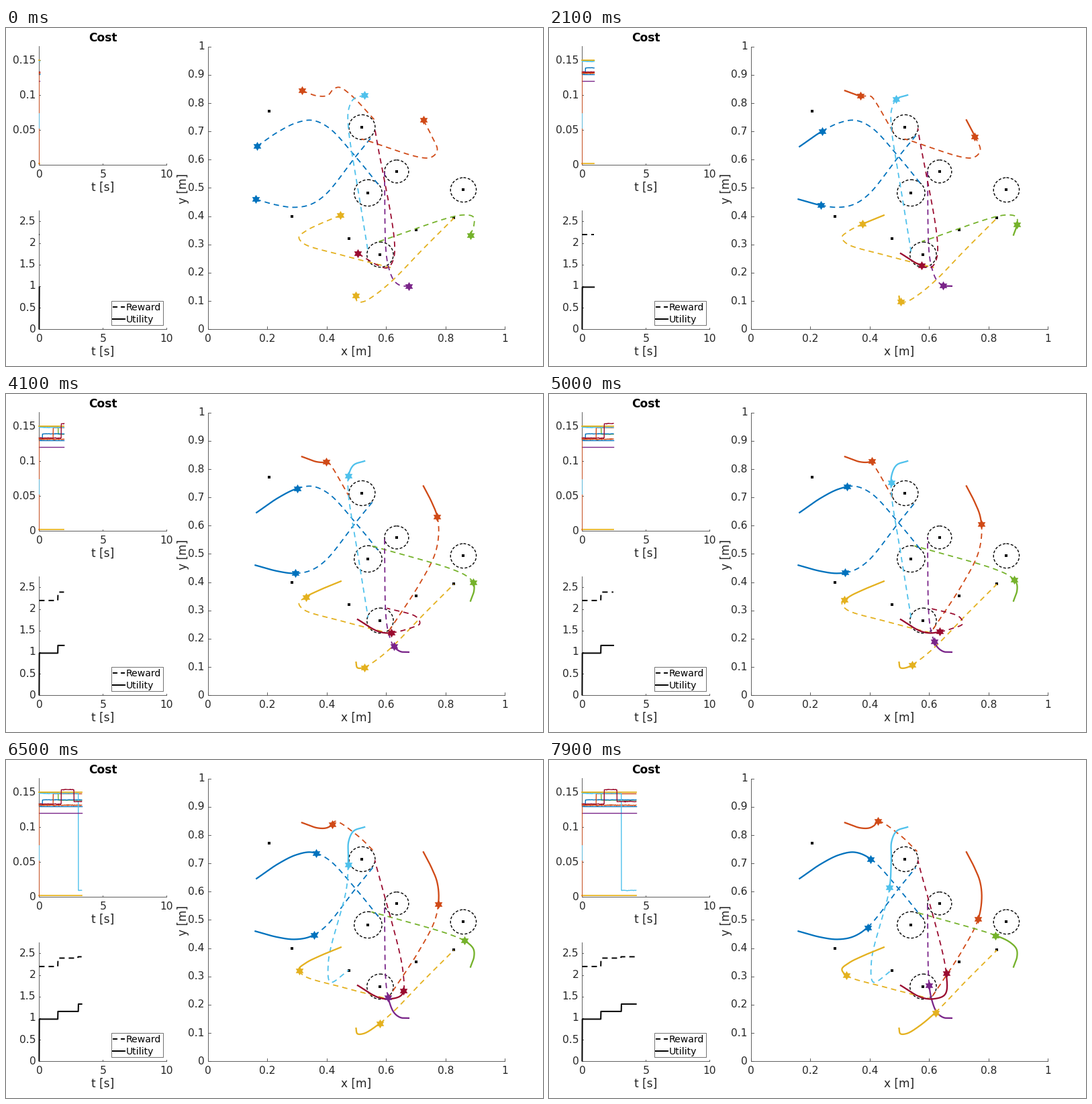
Animation of 800x504 px, one loop 8 s. Source, as a matplotlib script:

```python
import numpy as np
import matplotlib.pyplot as plt
from matplotlib.animation import FuncAnimation
from matplotlib.patches import Ellipse, Rectangle
from matplotlib.path import Path

W, H, FRAMES, STEP = 800, 504, 80, 100
LEG = 20      # frames between driven waypoints
DRIVEN = 5    # waypoints reached within one loop
SHIFT = 0.6   # pixel alignment of the whole stage

BLUE, ORANGE, YELLOW, PURPLE = "#0072bd", "#d04a17", "#e4b11f", "#7a2589"
GREEN, CYAN, CRIMSON, INK, AXIS = "#75b22b", "#4fc1ec", "#9a0c30", "#262626", "#505050"

plt.rcParams.update({"font.family": "DejaVu Sans", "lines.scale_dashes": False,
                     "lines.dash_capstyle": "butt"})


def spline(x, y, q):
    """Cubic Hermite spline through (x, y), evaluated at q."""
    x, y, q = np.asarray(x, float), np.asarray(y, float), np.atleast_1d(q)
    h = np.diff(x)
    col = (-1,) + (1,) * (y.ndim - 1)
    d = np.diff(y, axis=0) / h.reshape(col)
    a, b = h[:-1].reshape(col), h[1:].reshape(col)
    m = np.concatenate([d[:1], (b * d[:-1] + a * d[1:]) / (a + b), d[-1:]])
    i = np.clip(np.searchsorted(x, q, side="right") - 1, 0, len(h) - 1)
    u, hi = ((q - x[i]) / h[i]).reshape(col), h[i].reshape(col)
    return (y[i] * (1 + 2 * u) * (1 - u) ** 2 + m[i] * hi * u * (1 - u) ** 2
            + y[i + 1] * u * u * (3 - 2 * u) + m[i + 1] * hi * u * u * (u - 1))


class Curve:
    """Smooth path through waypoints, spaced by centripetal chord length."""

    def __init__(self, pts):
        self.pts = np.array(pts, float)
        seg = np.sqrt(np.hypot(*np.diff(self.pts, axis=0).T))
        self.s = np.concatenate([[0], np.cumsum(seg)])

    def part(self, a, b):
        return spline(self.s, self.pts, np.linspace(a, b, 200))

    def after(self, pos):
        pts = self.part(0, self.s[-1])
        k = np.argmin(np.hypot(*(pts - pos).T))
        return np.vstack([pos, pts[k + 1:]])


class Agent:
    """Reaches one waypoint per leg; the points beyond are its plan.

    Dropped plans are (until, shared waypoints, rest of the plan).
    """

    def __init__(self, color, way, *dropped):
        self.path = Curve(way)
        self.dropped = [(until, Curve(way[:k] + rest)) for until, k, rest in dropped]
        self.trail, = ax.plot([], [], color=color, lw=2.3, zorder=4,
                              solid_capstyle="butt")
        self.plan, = ax.plot([], [], color=color, lw=1.8, zorder=3, dashes=(8, 6))
        self.star, = ax.plot([], [], color=color, marker=HEXAGRAM, ms=13.4,
                             mew=0, ls="", zorder=5)

    def update(self, n):
        s = self.path.s
        begin, now = spline(LEG * np.arange(DRIVEN), s[:DRIVEN], [-1, n])
        trail = self.path.part(begin, now)
        plan = next((c.after(trail[-1]) for until, c in self.dropped if n < until),
                    self.path.part(now, s[-1]))
        self.trail.set_data(*trail.T)
        self.plan.set_data(*plan.T)
        self.star.set_data(*trail[-1:].T)


class Trace:
    """A stepped time series: (x from, level), ... with optional noise."""

    def __init__(self, color, *steps, noise=0, **style):
        self.x = np.arange(50, 140, 0.25)
        starts, levels = np.array(steps, float).T
        self.y = levels[np.searchsorted(starts, self.x, side="right") - 1]
        self.y += noise * np.repeat(rng.normal(size=len(self.x) // 4), 4)
        self.line, = ax.plot([], [], color=color, **{"lw": 1.4, **style})

    def update(self, cursor):
        k = self.x <= cursor
        self.line.set_data(self.x[k], self.y[k])


def text(x, y, s, size, **kw):
    ax.text(x, y, s, fontsize=size, **{"ha": "center", "va": "center",
                                       "color": INK, **kw})


def axes(x0, x1, y0, y1, xlim, xstep, ylim, ystep, ytop, xlabel, tick):
    """Left and bottom axis lines with inward ticks; ytop is the last y label."""
    style = dict(color=AXIS, lw=0.9, zorder=2)
    ax.plot([x0, x0, x1], [y1, y0, y0], **style)
    for v in np.arange(0, xlim + xstep / 2, xstep):
        x = x0 + (x1 - x0) * v / xlim
        ax.plot([x, x], [y0, y0 - tick], **style)
        text(x, y0 + 14, f"{v:g}", 15.5)
    for v in np.arange(0, ytop + ystep / 2, ystep):
        y = y0 + (y1 - y0) * v / ylim
        ax.plot([x0, x0 + tick], [y, y], **style)
        text(x0 - 5, y, f"{v:.2g}", 15.5, ha="right")
    text((x0 + x1) / 2, y0 + 34, xlabel, 17)


rng = np.random.default_rng(4)
HEXAGRAM = Path.unit_regular_star(6, innerCircle=0.577)

fig = plt.figure(figsize=(W / 72, H / 72), dpi=72, facecolor="white")
ax = fig.add_axes([0, 0, 1, 1])
ax.set(xlim=(SHIFT, W + SHIFT), ylim=(H + SHIFT, SHIFT))
ax.axis("off")

# Axes, labels and legend
axes(50, 240, 204.8, 28, 10, 5, 0.17, 0.05, 0.15, "t [s]", 2)
axes(50, 240, 449.8, 273, 10, 5, 2.75, 0.5, 2.5, "t [s]", 2)
axes(301.4, 744, 449.8, 28.4, 1, 0.2, 1, 0.1, 1, "x [m]", 4.4)
text(145, 15.5, "Cost", 17, weight="bold", color="black")
text(264.5, 240, "y [m]", 17, rotation=90)

ax.add_patch(Rectangle((157.2, 407.2), 77, 36, fc="white", ec=AXIS, lw=0.8, zorder=8))
for y, name, dash in ((416.7, "Reward", (0, (7, 5))), (434.2, "Utility", "-")):
    ax.plot([160, 177.5], [y, y], color="black", lw=2, ls=dash, zorder=9)
    text(179.3, y + 5.3, name, 14, ha="left", va="baseline", color="black", zorder=9)

# Targets (x, y, radius of the region around it)
for x, y, r in ((393, 125, 0), (531, 148.5, 19), (582.5, 214.5, 17.5),
                (540, 246.5, 20.2), (682, 242, 18.7), (668, 284, 0),
                (611.5, 301.5, 0), (427, 282, 0), (511.5, 314.5, 0),
                (558, 338.5, 19.2)):
    ax.plot(x, y, "s", color="black", ms=4.2, mew=0, zorder=3)
    if r:
        ax.add_patch(Ellipse((x, y), 2.05 * r, 1.95 * r, fill=False, ec="black",
                             lw=1.4, ls=(0, (4, 2.6)), zorder=3))

# Cost traces
for color, top, bottom in ((ORANGE, 66, 204), (CYAN, 128, 150)):
    ax.plot([50, 50], [top, bottom], color=color, lw=0.9, zorder=2.5)
traces = [
    Trace(GREEN, (50, 49), (78.3, 60.5)),
    Trace(BLUE, (50, 69.7)),
    Trace(BLUE, (50, 68.5), (55, 60), noise=0.15),
    Trace(ORANGE, (50, 68), noise=0.35),
    Trace(ORANGE, (50, 66.5), (71, 51)),
    Trace(CYAN, (50, 50.5), (108.5, 195), noise=0.2),
    Trace(YELLOW, (50, 49), lw=1.8),
    Trace(CRIMSON, (50, 66.3), (83, 44.8), (102, 62.5), noise=0.25),
    Trace(PURPLE, (50, 79.5)),
    Trace(YELLOW, (50, 202.5), lw=1.8),
    Trace("black", (50, 449), (50.2, 387), (78, 375.5), (108.5, 364.5), lw=2),
    Trace("black", (50, 308.5), (78, 300), (79.3, 296), (108, 294), lw=2,
          dashes=(8, 6)),
]

agents = [
    Agent(BLUE, [(374.5, 177), (405.7, 155.6), (433, 142), (456.5, 138.2),
                 (481, 149), (521, 192), (556, 235)]),
    Agent(BLUE, [(372.5, 256), (403.7, 264.5), (430, 268), (453.7, 264),
                 (476.5, 249), (521, 193), (547, 161)]),
    Agent(ORANGE, [(441.5, 94), (464, 101.8), (477.5, 102), (485, 98.3),
                   (491, 92), (524, 113), (549, 137)],
          (17, 2, [(480, 101), (488, 92), (497, 89), (515, 101), (549, 137)]),
          (56, 3, [(481, 103), (514, 157)])),
    Agent(ORANGE, [(622.5, 138), (634.4, 161), (642.8, 182.5), (645.2, 208),
                   (639.5, 239.5), (616, 285), (571, 354)],
          (24, 2, [(643, 183), (632, 194), (530, 166)])),
    Agent(YELLOW, [(499, 280), (469, 292.4), (448, 302.8), (437, 312.5),
                   (444, 322), (500, 339), (574, 358)]),
    Agent(YELLOW, [(522, 400), (524, 408.7), (533.5, 408.5), (552, 397.5),
                   (577.5, 376), (620, 332), (668, 284)]),
    Agent(GREEN, [(692.5, 309.5), (697.8, 294), (697, 282.5), (687.5, 272.5),
                  (664, 261.5), (545, 227)],
          (31, 3, [(680, 279.5), (556, 319)])),
    Agent(CYAN, [(535, 100.5), (518.5, 106.5), (511, 122), (510.5, 147.5),
                 (507.7, 193), (481, 300), (484, 332), (511, 314)],
          (61, 4, [(524, 235), (540, 334)])),
    Agent(PURPLE, [(601, 385.5), (588.5, 384.7), (578.8, 377.5), (571.3, 360),
                   (566.8, 334.5), (564.5, 215)]),
    Agent(CRIMSON, [(525, 337), (554.6, 354.4), (573.5, 356.8), (590.7, 350),
                    (592, 316), (550, 150)],
          (37, 2, [(569, 358), (579, 340), (550, 150)]),
          (56, 3, [(602, 350), (617, 343), (612, 333), (568, 320)])),
]


def draw(n):
    cursor = 50.3 + 0.77 * n + 0.0031 * n * n
    for trace in traces:
        trace.update(cursor)
    for agent in agents:
        agent.update(n)
    return []


anim = FuncAnimation(fig, draw, frames=FRAMES, interval=STEP,
                     init_func=lambda: draw(0), repeat=True, repeat_delay=0)
plt.show()
```
